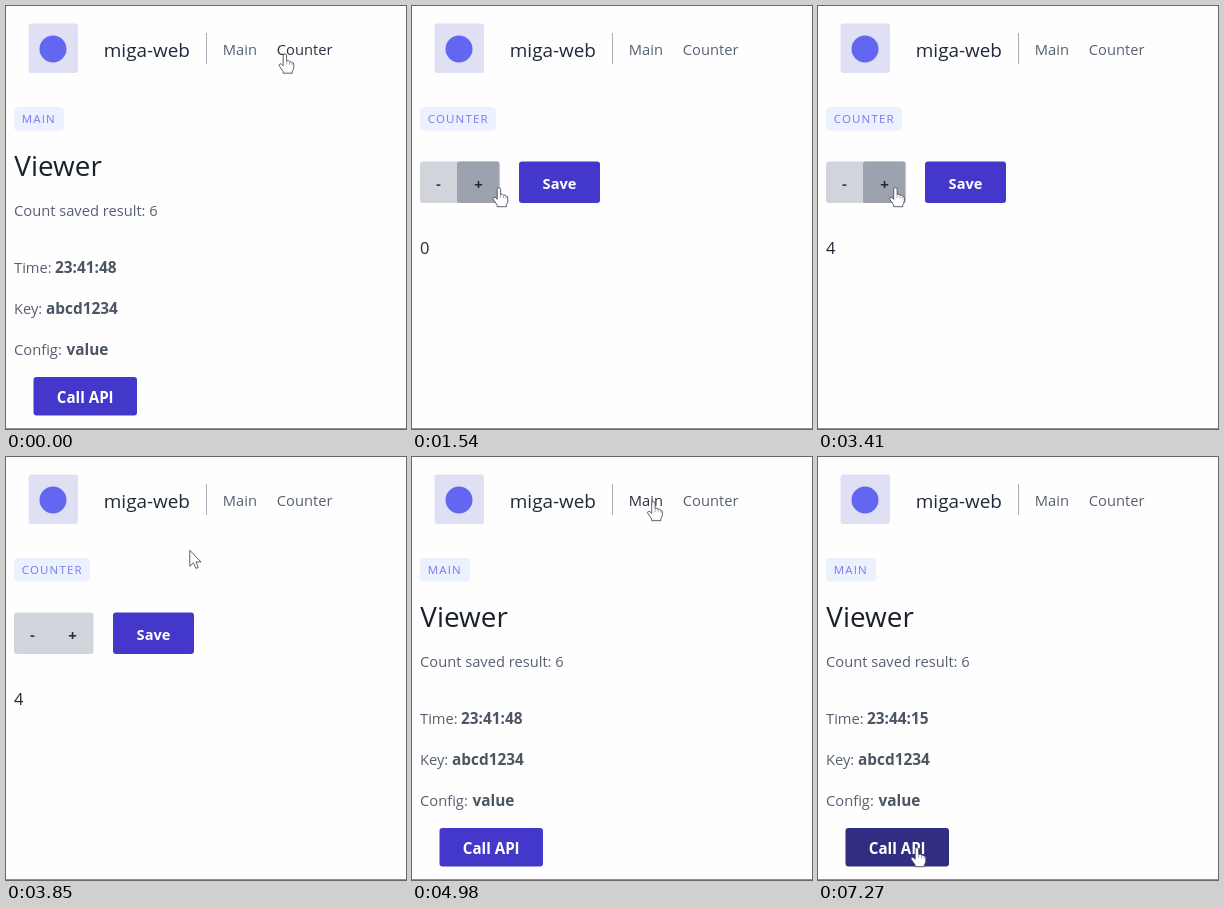
Write an HTML page that moves like this. It is 400 px wide and 423 px high and loops after 8 s.

```html
<!DOCTYPE html>
<html lang="en">
<head>
<meta charset="utf-8">
<title>Counter demo</title>
<style>
  html, body { margin: 0; width: 100%; height: 100%; overflow: hidden; background: #fefefe; }
  svg { display: block; width: 400px; height: 423px; font-family: "Open Sans", "Noto Sans", sans-serif; }
  text { white-space: pre; }
</style>
</head>
<body>
<svg id="stage" viewBox="0 0 400 423"></svg>
<script>
const LOOP = 8000, STEP = 143;
const stage = document.getElementById('stage');

// Clickable areas: x, y, width, height.
const areas = {
  main: [216, 32, 36, 24],
  counter: [270, 32, 57, 24],
  plus: [45, 155.5, 42.5, 41.5],
  save: [107, 155.5, 81, 41.5],
  call: [27.5, 371, 103.5, 38.5]
};

// The pointer glides to each place in a few eased steps.
const home = { x: 279, y: 48.5 };
const moves = [
  { at: 960, steps: 5, x: 87, y: 182 },
  { at: 1675, steps: 3, x: 74, y: 176 },
  { at: 3410, steps: 1, x: 77.5, y: 182 },
  { at: 3553, steps: 5, x: 241.5, y: 45 },
  { at: 5280, steps: 4, x: 107, y: 374 },
  { at: 5852, steps: 2, x: 99, y: 391 }
];
const clicks = [2260, 2410, 2690, 2840];
const waits = [4710, 6570];

const ease = p => p * p * (3 - 2 * p);

function pointerAt(t) {
  let { x, y } = home;
  for (const m of moves) {
    if (t < m.at) break;
    const step = Math.floor((t - m.at) / STEP) + 1;
    const p = ease(Math.min(1, step / m.steps));
    x += (m.x - x) * p;
    y += (m.y - y) * p;
  }
  return { x, y };
}

const text = (x, y, size, fill, s, extra = '') =>
  `<text x="${x}" y="${y}" font-size="${size}" fill="${fill}" ${extra}>${s}</text>`;
const bold = (x, y, size, fill, s, extra = '') =>
  text(x, y, size, fill, s, 'font-weight="700" ' + extra);
const rect = (x, y, w, h, fill, r = 0) =>
  `<rect x="${x}" y="${y}" width="${w}" height="${h}" rx="${r}" fill="${fill}"/>`;
const mid = 'text-anchor="middle"';

function badge(label, width) {
  return rect(8, 101, width, 23.5, '#ebf1ff', 4) +
    text(15.8, 117, 11.5, '#747cef', label, 'letter-spacing="1.15"');
}

function button([x, y, w, h], label, size, hot) {
  return rect(x, y, w, h, hot ? '#312e81' : '#4338ca', 3) +
    bold(x + w / 2, y + h / 2 + 6.5, size, '#fff', label, mid);
}

function header(over) {
  const link = (x, s, hot) => text(x, 49, 14.7, hot ? '#29303d' : '#566171', s);
  return rect(22.5, 17.5, 49.5, 49.5, '#dfe0f4', 3) +
    '<circle cx="47" cy="43" r="13.5" fill="#6366f1"/>' +
    text(97.8, 50.5, 18.9, '#1f2937', 'miga-web') +
    rect(200, 27, 1, 31, '#a9afba') +
    link(216.8, 'Main', over === 'main') + link(270.8, 'Counter', over === 'counter');
}

function mainPage(time, over) {
  const gray = '#566070';
  const row = (i, label, x, value) => {
    const y = 266.5 + 41.2 * i;
    return text(8, y, 14.7, gray, label) + bold(x, y, 15.4, '#4b5563', value);
  };
  return badge('MAIN', 50) +
    text(8.3, 169.5, 27.9, '#1a202c', 'Viewer') +
    text(8, 210, 14.7, gray, 'Count saved result: 6') +
    row(0, 'Time:', 49, time) + row(1, 'Key:', 40, 'abcd1234') + row(2, 'Config:', 60.5, 'value') +
    button(areas.call, 'Call API', 15.1, over === 'call');
}

function counterPage(count, over) {
  return badge('COUNTER', 76) +
    rect(8, 155.5, 79.5, 41.5, '#d1d5db', 3) +
    (over === 'plus' ? rect(...areas.plus, '#9ca3af', 2) : '') +
    bold(26.5, 183, 15, '#374151', '-', mid) +
    bold(66.5, 183.5, 15, '#1f2937', '+', mid) +
    button(areas.save, 'Save', 14.6, over === 'save') +
    text(8, 248, 16.5, '#1f2937', count);
}

function cursor({ x, y }, hand, busy) {
  const shape = hand
    ? 'M-1.8 1.3a1.7 1.7 0 0 1 3.4 0V6.4q2.4-.7 2.9.8 2-.6 2.5.9 1.8-.2 1.8 1.8V13q0 2-1.5 3.7V18.7H-1.8V17L-5.5 11.7q-1-1.8.4-2.4 1.4-.3 3.3 2z'
    : 'M0 0V16L3.7 12.6 6.2 18.2 8.6 17.1 6.2 11.7H11.2z';
  return `<g transform="translate(${x} ${y})" fill="none">` +
    `<path d="${shape}" fill="#fff" stroke="#4a4e58" stroke-width=".9" stroke-linejoin="round"/>` +
    (hand ? '<path d="M1.6 6.5V10M4.5 7.5V10.3M7 8.5V10.6" stroke="#858993" stroke-width=".7"/>' : '') +
    (busy ? '<circle cx="1" cy="1.3" r="6.3" stroke="#3f83a8" stroke-width="1.4" stroke-dasharray="3.4 1"/>' : '') +
    '</g>';
}

function scene(t) {
  const pos = pointerAt(t);
  const onCounter = t >= 270 && t < 4980;
  const live = ['main', 'counter', ...(onCounter ? ['plus', 'save'] : ['call'])];
  const over = live.find(name => {
    const [x, y, w, h] = areas[name];
    return pos.x >= x && pos.x <= x + w && pos.y >= y && pos.y <= y + h;
  });
  const count = clicks.filter(c => c <= t).length;
  const busy = waits.some(w => t >= w && t < w + 270);
  const time = t < 7270 ? '23:41:48' : '23:44:15';
  return rect(0, 0, 400, 423, '#fefefe') + header(over) +
    (onCounter ? counterPage(count, over) : mainPage(time, over)) +
    rect(0, 422, 400, 1, '#87949c') +
    cursor(pos, over, busy);
}

let shown = '';
const start = performance.now();
function tick() {
  const next = scene((performance.now() - start) % LOOP);
  if (next !== shown) stage.innerHTML = shown = next;
  requestAnimationFrame(tick);
}
tick();
</script>
</body>
</html>
```
